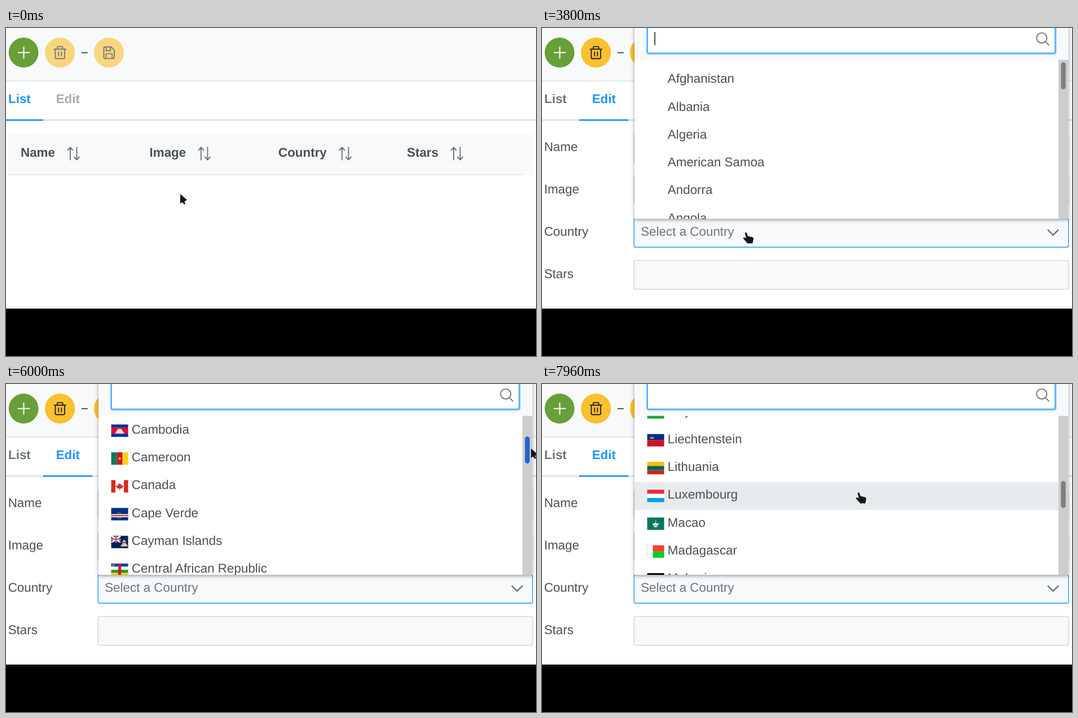
These frames come from a looping animation (940 px wide and 581 px high, 8000 ms). An HTML page:

```html
<!DOCTYPE html>
<html lang="en">
<head>
<meta charset="utf-8">
<title>Country picker</title>
<style>
html, body { margin: 0; width: 100%; height: 100%; overflow: hidden; background: #fff; }
svg { display: block; width: 940px; height: 581px; }
text { font: 22.4px "Liberation Sans", Arial, sans-serif; fill: #495057; text-rendering: geometricPrecision; white-space: pre; }
.b { font-weight: 700; }
.line { fill: none; stroke-linecap: round; stroke-linejoin: round; }
#back { filter: drop-shadow(0 2px 3px rgba(0,0,0,.38)); }
</style>
</head>
<body>
<svg viewBox="0 0 940 581">
  <defs><clipPath id="clip"><rect x="164" y="56.5" width="752" height="281.5"/></clipPath></defs>
  <rect width="940" height="581" fill="#fff"/>
  <rect width="940" height="93" fill="#f8f9fa"/>
  <rect y="93" width="940" height="1.5" fill="#dee2e6"/>

  <circle id="ring" cx="31.2" cy="43.5" r="30.7" fill="#c3d9af"/>
  <circle id="add" cx="31.2" cy="43.5" r="26.4"/>
  <path class="line" d="M21.5 43.5h20M31.5 33.5v20" stroke="#fff" stroke-width="2"/>
  <g id="tools">
    <circle cx="95.7" cy="43.5" r="26.6" fill="#fbc02d"/>
    <circle cx="182.5" cy="43.5" r="26.6" fill="#fbc02d"/>
    <g class="line" stroke="#212529" stroke-width="1.9">
      <path d="M85.5 37.5h20.5M91 37.3v-2.8q0-1.6 1.6-1.6h6.4q1.6 0 1.6 1.6v2.8M87.4 37.7v14.6q0 2 2 2h12.6q2 0 2-2V37.7M93.2 42.5v7M98.4 42.5v7"/>
      <path d="M173.5 35.5q0-2 2-2h10.8l5.7 5.7v12.9q0 2-2 2h-14.5q-2 0-2-2zM177.6 33.8v6.4h7.6v-6.2M177.3 53.8v-7.2q0-1 1-1h9q1 0 1 1v7.2"/>
    </g>
  </g>
  <rect x="134" y="42.8" width="11" height="1.7" fill="#343a40"/>

  <rect y="161.7" width="940" height="2.8" fill="#dee2e6"/>
  <rect id="bar" y="161.7" height="2.8" fill="#2196f3"/>
  <text id="tabList" class="b" x="4" y="133">List</text>
  <text id="tabEdit" class="b" x="88.7" y="133">Edit</text>

  <g id="table">
    <rect x="4" y="187.5" width="931" height="73" fill="#f8f9fa"/>
    <rect x="4" y="259" width="914" height="1.5" fill="#e1e4e8"/>
  </g>
  <g id="form"></g>
  <rect y="497" width="940" height="84" fill="#000"/>

  <g id="panel">
    <rect id="back" x="164" y="-20" width="769.5" height="358" fill="#fff"/>
    <rect x="164" y="-20" width="769.5" height="76.5" fill="#f8f9fa"/>
    <rect x="184.5" y="-20" width="728.5" height="67.5" rx="4.5" fill="#a6d5fa"/>
    <rect x="187" y="-20" width="723" height="64.6" rx="3" fill="#fff" stroke="#2196f3" stroke-width="1.5"/>
    <g class="line" stroke="#6c757d" stroke-width="1.9"><circle cx="886.3" cy="17.6" r="9"/><path d="M892.8 24.2l6 6"/></g>
    <rect id="caret" x="199.3" y="7" width="1.8" height="23.5" fill="#343a40"/>
    <g clip-path="url(#clip)"><g id="list"><rect id="hover" x="164" width="752" height="49.3" fill="#e8ebed"/></g></g>
    <rect x="916" y="56.5" width="17.5" height="281.5" fill="#cdcdcd"/>
    <rect id="thumb" x="920.4" width="8.4" height="47.6" rx="4.2"/>
  </g>
  <path id="cursor" fill="#15161f" stroke="#fff" stroke-opacity=".8" stroke-width="1.2" paint-order="stroke" stroke-linejoin="round"/>
</svg>
<script>
const $ = id => document.getElementById(id);
const add = (id, markup) => $(id).insertAdjacentHTML('beforeend', markup);
const set = (id, attrs) => { for (const k in attrs) $(id).setAttribute(k, attrs[k]); };
const show = (id, on) => set(id, { visibility: on ? 'visible' : 'hidden' });

const LOOP = 8000, STEP = 40, ROW = 49.28, TOP = 67.7;
const labels = ['Name', 'Image', 'Country', 'Stars'];
const fieldTop = i => 187.8 + i * 74.7;

const names = `Afghanistan|Albania|Algeria|American Samoa|Andorra|Angola|Anguilla|Antarctica|Antigua and Barbuda|Argentina|Armenia|Aruba|Australia|Austria|Azerbaijan|Bahamas|Bahrain|Bangladesh|Barbados|Belarus|Belgium|Belize|Benin|Bermuda|Bhutan|Bolivia|Bosnia and Herzegovina|Botswana|Bouvet Island|Brazil|British Indian Ocean Territory|Brunei Darussalam|Bulgaria|Burkina Faso|Burundi|Cambodia|Cameroon|Canada|Cape Verde|Cayman Islands|Central African Republic|Chad|Chile|China|Christmas Island|Cocos (Keeling) Islands|Colombia|Comoros|Congo|Congo, The Democratic Republic of the|Cook Islands|Costa Rica|Côte D'Ivoire|Croatia|Cuba|Cyprus|Czech Republic|Denmark|Djibouti|Dominica|Dominican Republic|Ecuador|Egypt|El Salvador|Equatorial Guinea|Eritrea|Estonia|Ethiopia|Falkland Islands (Malvinas)|Faroe Islands|Fiji|Finland|France|French Guiana|French Polynesia|French Southern Territories|Gabon|Gambia|Georgia|Germany|Ghana|Gibraltar|Greece|Greenland|Grenada|Guadeloupe|Guam|Guatemala|Guinea|Guinea-Bissau|Guyana|Haiti|Honduras|Hong Kong|Hungary|Iceland|India|Indonesia|Iran, Islamic Republic Of|Iraq|Ireland|Isle of Man|Israel|Italy|Jamaica|Japan|Jersey|Jordan|Kazakhstan|Kenya|Kiribati|North Korea|South Korea|Kuwait|Kyrgyzstan|Lao People's Democratic Republic|Latvia|Lebanon|Lesotho|Liberia|Libya|Liechtenstein|Lithuania|Luxembourg|Macao|Madagascar|Malawi|Malaysia|Maldives`.split('|');

// direction and stripe colours, then "colour:path" details in a 30 x 22 box
const star = (x, y, r) => 'M' + [...Array(10).keys()].map(i => {
  const a = i * Math.PI / 5, q = i % 2 ? r * .4 : r;
  return (x + q * Math.sin(a)).toFixed(1) + ' ' + (y - q * Math.cos(a)).toFixed(1);
}).join('L') + 'z';
const dot = (x, y, r) => `M${x - r} ${y}a${r} ${r} 0 1 0 ${2 * r} 0a${r} ${r} 0 1 0 ${-2 * r} 0z`;
const starRing = [...Array(10).keys()].map(i =>
  dot(+(14 + 5 * Math.sin(i * Math.PI / 5)).toFixed(1), +(13.5 + 5 * Math.cos(i * Math.PI / 5)).toFixed(1), .8)).join('');
const flags = {
  'Afghanistan': ['v 000 be0000 090', 'e3a79b:' + dot(15, 11, 5), 'be0000:' + dot(15, 10.5, 3), 'f0d0c8:M13.5 9h3v5h-3z'],
  'Albania': ['h e41e20', '200:M15 5l2 2 2-2 1 2 3-1-2 4 1 2-4 1 1 3-2-1-2 4-2-4-2 1 1-3-4-1 1-2-2-4 3 1 1-2 2 2z'],
  'Algeria': ['v 006233 fff', 'd21034:M19 6.5a5.5 5.5 0 1 0 0 9a4.3 4.3 0 1 1 0-9z' + star(18, 11, 2.6)],
  'American Samoa': ['h 006', 'bd1021:M0 11L30 0v22z', 'fff:M4 11L30 2v18z', '8c4a20:M15 12l5-5 6-2-2 4 3 1-4 3-1 4-3-3z', 'e9b72c:M18 16l5-1-1 3z'],
  'Andorra': ['v 0018a8 fedf00 d0103a', 'c7903c:M12 7h6v6q-3 4-6 0z', 'e8c36a:' + dot(15, 11, 1.6)],
  'Angola': ['h f00 000', 'ffec00:' + star(16, 10, 3.5) + 'M10 6q9 2 9 9l-2 1q1-6-7-8z'],
  'Cambodia': ['h 032ea1 e00025 e00025 032ea1', 'f4e6e6:M7 16v-2h2v-3h2V9l1.5-2L14 9l1-3 1 3 1.500-2L19 9v2h2v3h2v2z'],
  'Cameroon': ['v 007a5e ce1126 fcd116', 'fcd116:' + star(15, 11, 3.4)],
  'Canada': ['v d52b1e fff fff d52b1e', 'd52b1e:M15 5l1.500 3 2-1-.5 4 3-2 1 2-4 4h-2.500v3h-1v-3H12l-4-4 1-2 3 2-.5-4 2 1z'],
  'Cape Verde': ['h 003087', 'fff:M0 11h30v5.500H0z', 'cf2027:M0 12.800h30v1.800H0z', 'f7d116:' + starRing],
  'Cayman Islands': ['h 00205b', 'fff:M0 0h3l4 3V0h3v3l4-3h3v2l-4 3h4v3h-4l4 3v1h-3l-4-3v3H7V9l-4 3H0v-1l4-3H0V5h4L0 2z', 'c8102e:M7.700 0h1.600v5.200H17v1.600H9.300V12H7.700V6.800H0V5.200h7.700z', 'd9cfa0:M20 10l3-3 3 3v4l3 3v2H17v-2l3-2z', 'c8102e:M20.500 11h5v2h-5z'],
  'Central African Republic': ['h 003f9f fff 289728 ffce00', 'd21034:M12.500 0h5v22h-5z', 'ffce00:' + star(4, 3, 2.4)],
  'Lebanon': ['h ed1c24 fff fff ed1c24', '00a651:M15 6l5 9h-4v1h-2v-1h-4z'],
  'Lesotho': ['h 00209f fff fff 009543', '111:M15 7l1 4 3 3q-4 2-8 0l3-3z'],
  'Liberia': ['h bf0a30 fff bf0a30 fff bf0a30 fff bf0a30 fff bf0a30 fff bf0a30', '002868:M0 0h10v10H0z', 'fff:' + star(5, 5, 3.8)],
  'Libya': ['h e70013 000 000 239e46', 'fff:M16 8.500a3.200 3.200 0 1 0 0 5a2.600 2.600 0 1 1 0-5z' + star(17.5, 11, 1.8)],
  'Liechtenstein': ['h 002b7f ce1126', 'd9a441:M5 8V5l2 1 1.500-2L10 6l2-1v3z'],
  'Lithuania': ['h fdb913 006a44 c1272d'],
  'Luxembourg': ['h ed2939 fff 00a1de'],
  'Macao': ['h 00785e', 'fff:M15 7l2 4 4-1-2 4h-8l-2-4 4 1zM11 15h8l-2 2h-4z', 'fbd116:' + star(15, 5, 1.5)],
  'Madagascar': ['h fc3d32 00cd28', 'fff:M0 0h10v22H0z'],
  'Malawi': ['h 000 ce1126 339e35', 'ce1126:M11 7a4 4 0 0 1 8 0z']
};
const palette = ['c8102e', 'fff', '00843d', 'ffcd00', '00308f', 'e4002b', '4a90d9'];
const anyFlag = i => [(i % 3 ? 'h ' : 'v ') + [0, 1, 2].map(k => palette[(i * 5 + k * (1 + i % 2)) % 7]).join(' ')];

function flag(name, i) {
  const [base, ...details] = flags[name] || anyFlag(i);
  const [dir, ...cols] = base.split(' ');
  const n = cols.length;
  return cols.map((c, k) => dir === 'h'
    ? `<rect y="${22 * k / n}" width="30" height="${22 / n}" fill="#${c}"/>`
    : `<rect x="${30 * k / n}" width="${30 / n}" height="22" fill="#${c}"/>`).join('') +
    details.map(d => { const [c, p] = d.split(':'); return `<path fill="#${c}" d="${p}"/>`; }).join('');
}

// static parts
const colX = [26, 254.5, 483, 711], sortX = [114, 346, 596, 794];
labels.forEach((label, i) => {
  const x = sortX[i], y = fieldTop(i);
  add('table', `<text class="b" x="${colX[i]}" y="228">${label}</text>
    <path class="line" stroke="#6c757d" stroke-width="1.9" d="M${x} 233.500v-22m-4.500 5l4.500-5 4.500 5M${x + 11.500} 211.500v22m-4.500-5l4.500 5 4.500-5"/>`);
  add('form', `<text x="3.7" y="${y + 30.6}">${label}</text>
    <rect id="field${i}" x="163.200" y="${y}" width="770.600" height="51" rx="3" fill="#f8f9fa" stroke-width="1.4"/>`);
});
add('form', `<text x="175.200" y="367.500" style="fill:#6c757d">Select a Country</text>
  <path class="line" stroke="#6c757d" stroke-width="2.4" d="M897.500 357.800l9 9 9-9"/>`);
names.forEach((name, i) => add('list', `<text x="222.800" y="${TOP + i * ROW + 29.6}">${name}</text>`));
add('list', '<g id="flags">' + names.map((name, i) =>
  `<g transform="translate(186.600 ${TOP + i * ROW + 13.5})">${flag(name, i)}</g>`).join('') + '</g>');

// motion tables
const at = (name, shift) => names.indexOf(name) * ROW + shift;
const END = at('Luxembourg', -106);
const scrollKeys = [
  [5560, 0], [5760, 480], [6000, at('Cambodia', 9.5)], [6040, at('Cambodia', 9.5)], [6400, 4500], [6600, 5150],
  [6840, 5150], [7080, at('Lesotho', -10.5)], [7120, at('Lesotho', -10.5)], [7400, END]
];
// time, x, y, pointer kind (kept until a new one)
const cursorKeys = [
  [0, 309, 294, 'arrow'], [440, 309, 294], [600, 350, 284], [720, 290, 250, 'hand'], [800, 190, 187, 'arrow'],
  [1000, 29, 61], [1120, 29, 61], [1160, 29, 50, 'hand'],
  [2160, 29, 50], [2280, 60, 90, 'arrow'], [2440, 140, 165], [2560, 220, 232, 'beam'], [2680, 290, 300],
  [2800, 335, 345, 'hand'], [2880, 350, 389, 'arrow'], [2960, 360, 397], [3080, 360, 397], [3120, 361, 384, 'hand'], [3400, 362, 362],
  [3840, 362, 362], [4000, 560, 290], [4200, 830, 192], [4560, 830, 192],
  [4680, 845, 146], [4720, 845, 146], [4880, 852, 96], [5120, 852, 96],
  [5160, 905, 90], [5200, 920, 86, 'arrow'], [5280, 926, 83], [5560, 926, 83],
  [6000, 931, 114], [6040, 931, 114], [6400, 934, 164], [6600, 935, 172], [6840, 935, 172],
  [7080, 936, 183], [7400, 937, 186], [7720, 937, 186],
  [7760, 910, 190, 'hand'], [7960, 562, 192]
];
const shapes = {
  arrow: 'M0 0V17L3.800 14.600 7 18.800 9.200 17.400 7.500 13.500 12 10.500z',
  hand: 'M-2.200 1.200Q-1-1 1 1L2.800 6.500 11 8.500Q13.500 9.500 13 12L11.500 19.500H2.500L-5 11Q-5.500 8.500-3 9L0 10.500z',
  beam: 'M-3-10h6v1.500H.8v17H3V10h-6V8.500h2.200v-17H-3z'
};

function sample(keys, t) {
  let i = keys.findIndex(k => k[0] > t);
  if (i < 0) return keys[keys.length - 1].slice(1, 3);
  if (!i) return keys[0].slice(1, 3);
  const a = keys[i - 1], b = keys[i], f = (t - a[0]) / (b[0] - a[0]);
  return a.slice(1, 3).map((v, k) => v + (b[k + 1] - v) * f);
}
const kindAt = t => cursorKeys.reduce((kind, k) => k[0] <= t && k[3] || kind, 'arrow');
const mix = (a, b, f) => `rgb(${a.map((v, i) => Math.round(v + (b[i] - v) * f))})`;
// a 200 ms colour fade that follows an on/off state
const fade = (state, t) => [0, 1, 2, 3, 4].reduce((s, k) => s + (state(t - k * STEP) ? .2 : 0), 0);

function overField(i, t) {
  if (t < 1800 || t >= 3600) return false;
  const [x, y] = sample(cursorKeys, t), top = fieldTop(i);
  return x > 163 && x < 934 && y > top && y < top + 51;
}

function draw(t) {
  const edit = t >= 1800, open = t >= 3600;
  show('ring', t >= 1680 && t < 3640);
  set('add', { fill: mix([104, 159, 56], [90, 143, 47], fade(s => s >= 1160 && s < 2240, t)) });
  set('tools', { opacity: edit ? 1 : .6 });
  set('bar', edit ? { x: 66, width: 87.5 } : { x: 0, width: 66 });
  $('tabList').style.fill = edit ? '#6c757d' : '#2196f3';
  $('tabEdit').style.fill = edit ? '#2196f3' : '#a7abb0';
  show('table', !edit);
  show('form', edit);
  labels.forEach((_, i) => set('field' + i, {
    stroke: mix([206, 212, 218], [33, 150, 243], open && i === 2 ? 1 : fade(s => overField(i, s), t))
  }));

  const [x, y] = sample(cursorKeys, t);
  const scroll = sample(scrollKeys, t)[0];
  const grow = Math.min(1, Math.max(0, (t - 3560) / 160));
  $('panel').style.display = open ? '' : 'none';
  set('panel', { opacity: grow, transform: `translate(0 338) scale(1 ${.8 + .2 * grow}) translate(0 -338)` });
  $('caret').style.display = Math.floor((t - 3640) / 1200) % 2 === 0 ? '' : 'none';
  $('flags').style.display = t >= 3960 ? '' : 'none';
  set('list', { transform: `translate(0 ${-scroll})` });
  const row = Math.floor((y + scroll - TOP) / ROW);
  const hovering = t > 3840 && (t < 5200 || t >= 7760) && x < 916 && y < 338;
  $('hover').style.display = hovering ? '' : 'none';
  set('hover', { y: TOP + row * ROW });
  set('thumb', {
    y: 60.8 + scroll * 111 / END,
    fill: t >= 5600 && t < 7560 ? '#2264cc' : t >= 5200 && t < 7760 ? '#666' : '#7f7f7f'
  });
  set('cursor', { d: shapes[kindAt(t)], transform: `translate(${x} ${y})` });
}

const start = performance.now();
function tick() {
  const t = (performance.now() - start) % LOOP;
  draw(Math.floor(t / STEP) * STEP);
  requestAnimationFrame(tick);
}
tick();
</script>
</body>
</html>
```
